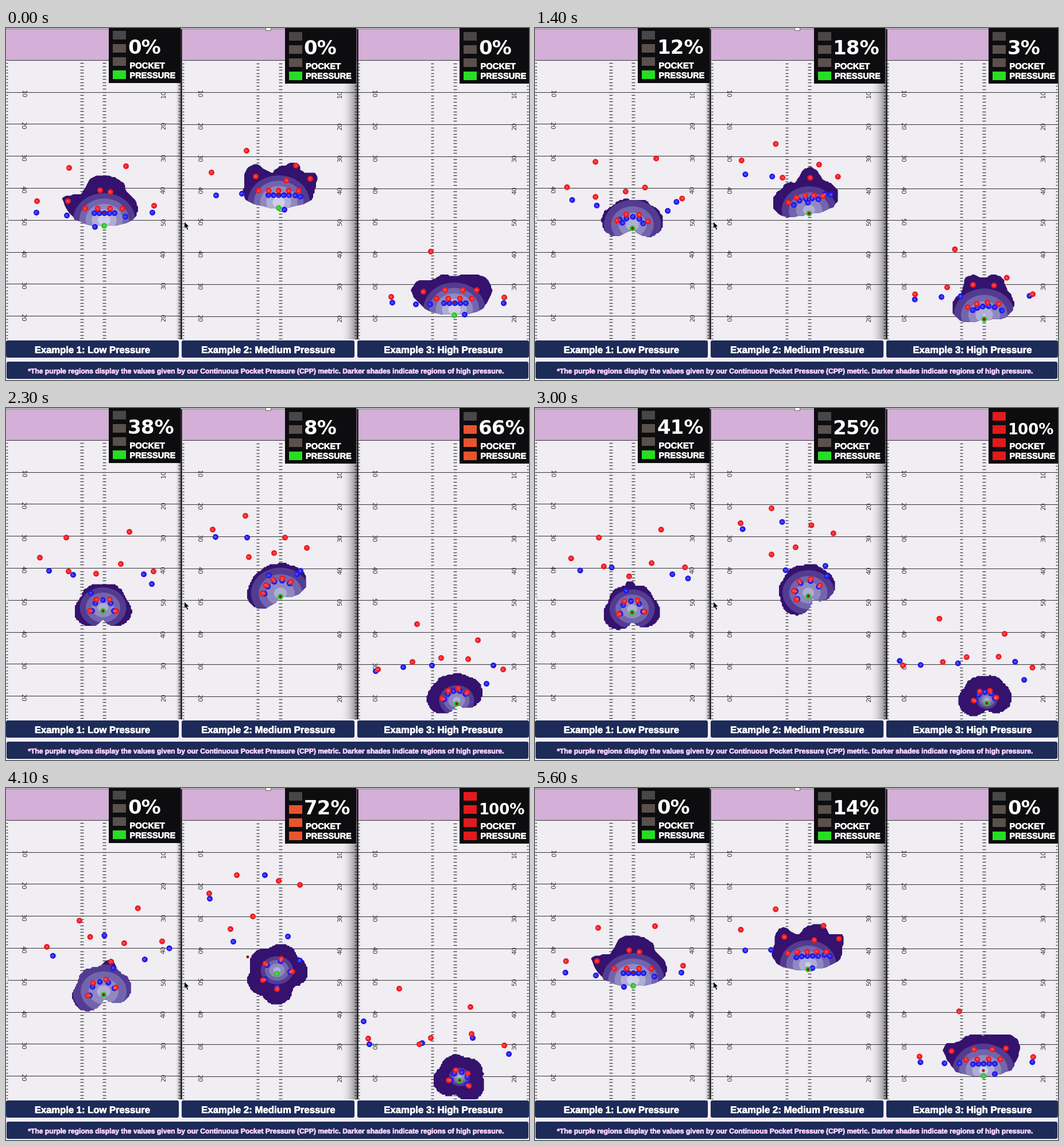
These frames come from a looping animation (911x614 px, 5.7 s). A matplotlib script:

```python
import random

import matplotlib.pyplot as plt
import numpy as np
from matplotlib.animation import FuncAnimation
from matplotlib.collections import LineCollection
from matplotlib.patches import Ellipse, FancyBboxPatch, Polygon, Rectangle
from matplotlib.patheffects import withStroke

W, H, FRAMES, STEP = 911, 614, 57, 100
PT = 0.72  # points per pixel at 100 dpi
FIELD, INK, NAVY = "#f0edf3", "#3a383c", "#1d2b59"
RED, BLUE, GREEN = "#ef191e", "#1e18eb", "#2ec42c"
DARK = "#34126d"
BANDS = ["#533b91", "#7265ad", "#9089c1", "#b0add6", "#cfcfe8"]
OFF = ["#484648", "#5a504c", "#5a504c"]
RAYS = np.linspace(0, 2 * np.pi, 120, endpoint=False)
DIRS = np.stack([np.cos(RAYS), np.sin(RAYS)], 1)

random.seed(11)
fig = plt.figure(figsize=(W / 100, H / 100), dpi=100, facecolor=FIELD)
ax = fig.add_axes([0, 0, 1, 1])
ax.set(xlim=(0, W), ylim=(H, 0))
ax.axis("off")


def box(x0, y0, x1, y1, color, z=1, **kw):
    kw.setdefault("lw", 0)
    return ax.add_patch(Rectangle((x0, y0), x1 - x0, y1 - y0, fc=color, zorder=z, **kw))


def write(x, y, s, size, color="white", font="DejaVu Sans", z=6, **kw):
    return ax.text(x, y, s, size=size * PT, color=color, family=font, zorder=z, **kw)


def heavy(x, y, s, size, color="white", **kw):
    write(x, y, s, size, color, "Liberation Sans", weight="bold",
          path_effects=[withStroke(linewidth=0.45, foreground=color)], **kw)


def banner(x0, y0, x1, y1, s, size, color="white"):
    ax.add_patch(FancyBboxPatch((x0, y0), x1 - x0, y1 - y0, fc=NAVY, lw=0, zorder=5,
                                boxstyle="round,pad=0,rounding_size=3"))
    heavy((x0 + x1) / 2, (y0 + y1) / 2 + 1, s, size, color, ha="center", va="center_baseline")


def shade(x0, x1, depth):
    ramp = np.zeros((1, 32, 4))
    ramp[..., 3] = depth * np.linspace(0, 1, 32) ** 2
    ax.imshow(ramp, extent=(x0, x1, 543, 0), aspect="auto", zorder=2.5)


def row(x0, x1, y, n):
    return np.stack([np.linspace(x0, x1, n), np.full(n, y)], 1)


def arc(center, radius, start, stop, n):
    a = np.radians(np.linspace(start, stop, n))
    return np.array(center) + radius * np.stack([np.cos(a), -np.sin(a)], 1)


def spline(times, keys):
    """Smooth path through the keys, starting from rest and drifting on past the end."""
    times, keys = np.array(times, float), np.array(keys, float)
    slope = np.gradient(keys, times, axis=0)
    slope[0] = 0

    def at(t):
        t = max(t, times[0])
        if t >= times[-1]:
            return keys[-1] + slope[-1] * (t - times[-1])
        k = np.searchsorted(times, t, "right") - 1
        d = times[k + 1] - times[k]
        u = (t - times[k]) / d
        a, b = keys[k], keys[k + 1]
        return (a + (b - a) * u * u * (3 - 2 * u)
                + d * u * (1 - u) * (slope[k] * (1 - u) - slope[k + 1] * u))

    return at


def halo_outline(center, foes, reach):
    """Outline, seen from center, of discs that shrink with distance from it."""
    d = foes - center
    dist = np.hypot(*d.T)
    size = 27 * np.clip((reach - dist) / 25, 0, 1)
    along = DIRS @ d.T
    gap = size ** 2 - (dist ** 2 - along ** 2)
    r = np.where(gap > 0, along + np.sqrt(np.maximum(gap, 0)), 0).max(axis=1)
    r = np.maximum(r, 4)
    r = (np.roll(r, 2) + np.roll(r, 1) + r + np.roll(r, -1) + np.roll(r, -2)) / 5
    return np.round((center + DIRS * r[:, None]) / 2.5) * 2.5


class Play:
    """One field: a passer, a line of blockers, a front of rushers and free runners."""

    def __init__(self, left, right, hashes, dy, meter, snap, end, reset, fade, throw=None):
        self.snap, self.reset, self.fade, self.throw = snap, reset, fade, throw
        self.times = snap, 2300, end
        self.paths, self.colors = [], []
        self.draw_field(left, right, hashes, dy)
        self.draw_gauge(meter, dy)

    def draw_field(self, left, right, hashes, dy):
        top = 55.8 + dy
        box(left, 1 + dy, right, top, "#d4afd8")
        lines = [[(left, top), (right, top)]]
        for k, n in enumerate((10, 20, 30, 40, 50, 40, 30, 20), 1):
            y = top + 55.8 * k
            lines.append([(left, y), (right, y)])
            for x, turn in ((hashes[0] - 102.5, -90), (hashes[1] + 104, 90)):
                write(x, y + 3, n, 11, INK, z=2, rotation=turn, ha="center", va="center")
        ticks = []
        for y in top + 5.58 * np.arange(1, 88):
            ticks += [[(x - 2.7, y), (x + 2.7, y)] for x in hashes]
            ticks += [[(left, y), (left + 3, y)], [(right - 4, y), (right - 1, y)]]
        ax.add_collection(LineCollection(lines, colors=INK, lw=0.75, zorder=2))
        ax.add_collection(LineCollection(ticks, colors=INK, lw=0.9, zorder=2))

    def draw_gauge(self, x, dy):
        dy *= 2.5
        box(x - 7, 0, min(x + 117.5, W), 95.5 + dy * 0.7, "#0d0c0f", 5)
        self.lamps = [box(x, y + dy, x + 23, y + 15 + dy, "k", 6) for y in (5, 28, 51, 74)]
        self.readout = write(x + 26, 45 + dy, "", 34, weight="bold")
        heavy(x + 29.5, 70.5 + dy * 0.7, "POCKET", 14.7)
        heavy(x + 29.5, 87.5 + dy * 0.7, "PRESSURE", 14.5)

    def run(self, color, *points):
        self.paths.append(points)
        self.colors.append(color)

    def blue(self, *points):
        self.run(BLUE, *points)

    def red(self, *points):
        self.run(RED, *points)

    def pocket(self, passer, line, front, cups):
        """Line and front fold from straight rows into arcs around the passer."""
        x0, x1, y = line
        f0, f1, n = front
        for color, start, count, out in ((BLUE, row(x0, x1, y, 5), 5, 0),
                                         (RED, row(f0, f1, y - 8, n), n, 4)):
            folds = [arc(p, r + out, a, b, count) for p, (r, a, b) in zip(passer[1:], cups)]
            for points in zip(start, *folds):
                self.run(color, *points)
        self.run(GREEN, *passer)
        self.spot = np.array([passer[0][0], y - 1])

    def ready(self, times, values):
        self.percent = times, values
        self.pos = spline(self.times, np.stack(self.paths, 1))
        self.foes = np.array([c == RED for c in self.colors])
        self.blob = ax.add_patch(Polygon(DIRS, fc=DARK, lw=0, zorder=3))
        self.rings = [ax.add_patch(Ellipse((0, 0), 1, 1, fc=c, lw=0, zorder=3.1 + k / 10))
                      for k, c in enumerate(BANDS)]
        n = len(self.paths)
        self.dots = ax.scatter([0] * n, [0] * n, s=(10 * PT) ** 2, c=self.colors, lw=0, zorder=4)
        self.tags = [write(0, 0, random.randint(10, 99), 4.6, "#ffffff90", z=4.1,
                           ha="center", va="center_baseline") for _ in range(n)]
        self.pigskin = ax.add_patch(Ellipse((0, 0), 5, 5, fc="#8a1c1c", lw=0, zorder=4.2))

    def draw(self, ms):
        t = ms if ms < self.reset else ms - self.reset
        spots = self.pos(t)
        passer = spots[-1]
        value = int(np.interp(t, *self.percent))

        reach = 88 - 22 * min(1, t / self.fade) ** 2
        self.blob.set_xy(halo_outline(passer, spots[self.foes], reach))
        age = np.clip((t - self.snap) / 1400, 0, 1)
        glow = 47 * (1 - 0.0045 * value) - 0.1 * value
        for k, ring in enumerate(self.rings):
            r = max(0, glow * (1 - (0.2 + 0.06 * age) * k))
            ring.set(center=passer - (0, 10 - 4 * age), width=2.3 * r, height=2 * r)
            ring.set_clip_path(self.blob)

        self.dots.set_offsets(spots)
        for tag, spot in zip(self.tags, spots):
            tag.set_position(spot)
        self.pigskin.set_center(self.ball(t, passer))
        self.show(value)

    def ball(self, t, passer):
        if self.throw and t > self.throw[0]:
            begin, target, flight = self.throw
            return passer + (np.array(target) - passer) * min(1, (t - begin) / flight)
        return self.spot + (passer - self.spot) * np.clip((t - self.snap) / 500, 0, 1)

    def show(self, value):
        if value > 75:
            colors = ["#e21a1c"] * 4
        elif value >= 50:
            colors = OFF[:1] + ["#e9542c"] * 3
        else:
            colors = OFF + ["#26de22"]
        for lamp, c in zip(self.lamps, colors):
            lamp.set_facecolor(c)
        self.readout.set_text(f"{value}%")
        self.readout.set_fontsize((26 if value == 100 else 34) * PT)


low = Play(0, 304, (132, 171), 0, 186, snap=100, end=5000, reset=5500, fade=1300)
low.blue((53, 322), (75, 284), (84, 301))
low.blue((106, 327), (117, 291), (203, 240))
low.blue((208, 329), (254, 307), (299, 265))
low.blue((255, 322), (240, 290), (244, 307))
low.blue((155, 347), (148, 323), (210, 311))
low.red((110, 244), (105, 226), (142, 236))
low.red((209, 241), (215, 216), (238, 208))
low.red((54, 302), (59, 261), (78, 290))
low.red((108, 302), (109, 285), (169, 246))
low.red((164, 283), (157, 289), (199, 311))
low.red((182, 286), (200, 272), (208, 271))
low.red((258, 310), (257, 285), (281, 259))
low.pocket(passer=[(171, 345), (169, 354), (171, 364)], line=(154, 189, 323),
           front=(138, 203, 4), cups=[(19, 180, 0), (27, 180, 47)])
low.ready((0, 1400, 2300, 3000, 4100, 5000), (0, 12, 38, 41, 0, 3))

mid = Play(307, 611, (438.5, 478), 0.6, 492.5, snap=0, end=4100, reset=5000, fade=2300,
           throw=(3800, (387, 275), 500))
mid.blue((366, 292), (365, 225), (355, 193))
mid.blue((411, 289), (420, 226), (451, 152))
mid.blue((504, 292), (507, 290), (512, 301))
mid.blue((513, 294), (513, 284), (491, 259))
mid.blue((485, 317), (458, 292), (396, 268))
mid.red((419, 214), (417, 188), (402, 152))
mid.red((358, 252), (360, 212), (354, 184))
mid.red((435, 259), (423, 260), (391, 246))
mid.red((505, 240), (486, 226), (475, 162))
mid.red((530, 263), (524, 244), (512, 169))
mid.red((488, 266), (467, 253), (430, 224))
mid.pocket(passer=[(475, 314), (478, 329), (472, 324)], line=(457, 493, 291.5),
           front=(440, 510, 5), cups=[(28, 170, 55), (23, 270, 8)])
mid.ready((0, 600, 1400, 2300, 3000, 4100), (0, 14, 18, 8, 25, 72))

high = Play(613, W, (742.5, 782), 0.6, 797, snap=500, end=4100, reset=4800, fade=2300)
high.blue((673, 479), (644, 459), (623, 407))
high.blue((714, 482), (692, 452), (633, 447))
high.blue((739, 482), (742, 449), (725, 445))
high.blue((867, 480), (849, 449), (813, 436))
high.blue((799, 500), (837, 481), (876, 464))
high.red((740, 390), (716, 377), (685, 350))
high.red((671, 469), (648, 456), (631, 437))
high.red((727, 460), (708, 443), (720, 447))
high.red((765, 457), (758, 436), (740, 436))
high.red((796, 457), (805, 438), (811, 429))
high.red((820, 457), (822, 405), (809, 382))
high.red((868, 470), (866, 456), (868, 449))
high.pocket(passer=[(781, 501), (785, 516), (790, 510)], line=(763, 801, 480),
            front=(750, 811, 4), cups=[(23, 160, 48), (15, 180, -30)])
high.ready((800, 1400, 2300, 3000), (0, 3, 66, 100))

shade(294, 305, 0.45)
shade(582, 612, 0.45)
for x in (305, 611.8):
    ax.plot([x, x], [3, 543], color="#17171a", lw=1.8, zorder=4.5)
ax.plot([0, W], [0.5, 0.5], color="#77707c", lw=0.8, zorder=4.5)

box(0, 543, W, H, FIELD, 4.6)
banner(0, 545, 301, 575, "Example 1: Low Pressure", 16.6)
banner(306, 545, 607, 575, "Example 2: Medium Pressure", 16.8)
banner(612, 545, W, 575, "Example 3: High Pressure", 16.8)
banner(1, 582, 910, 612, "*The purple regions display the values given by our Continuous Pocket "
       "Pressure (CPP) metric. Darker shades indicate regions of high pressure.", 12.1, "#f6cff6")

# selection handles and mouse pointer
box(452, -4, 461, 4, "white", 7, ec="#555", lw=0.6)
box(-4, 329, 3, 336, "white", 7, ec="#888", lw=0.5)
ax.add_patch(Polygon([(310.5, 337.5), (310.5, 350), (313.3, 347.6), (315.4, 352.3), (317.8, 351.2),
                      (315.8, 346.8), (319.4, 346.4)], fc="black", ec="white", lw=0.6, zorder=8))
ax.set(xlim=(0, W), ylim=(H, 0))


def step(i):
    for play in (low, mid, high):
        play.draw(i * STEP)
    return []


anim = FuncAnimation(fig, step, frames=FRAMES, interval=STEP, init_func=lambda: [], repeat=True)
plt.show()
```
